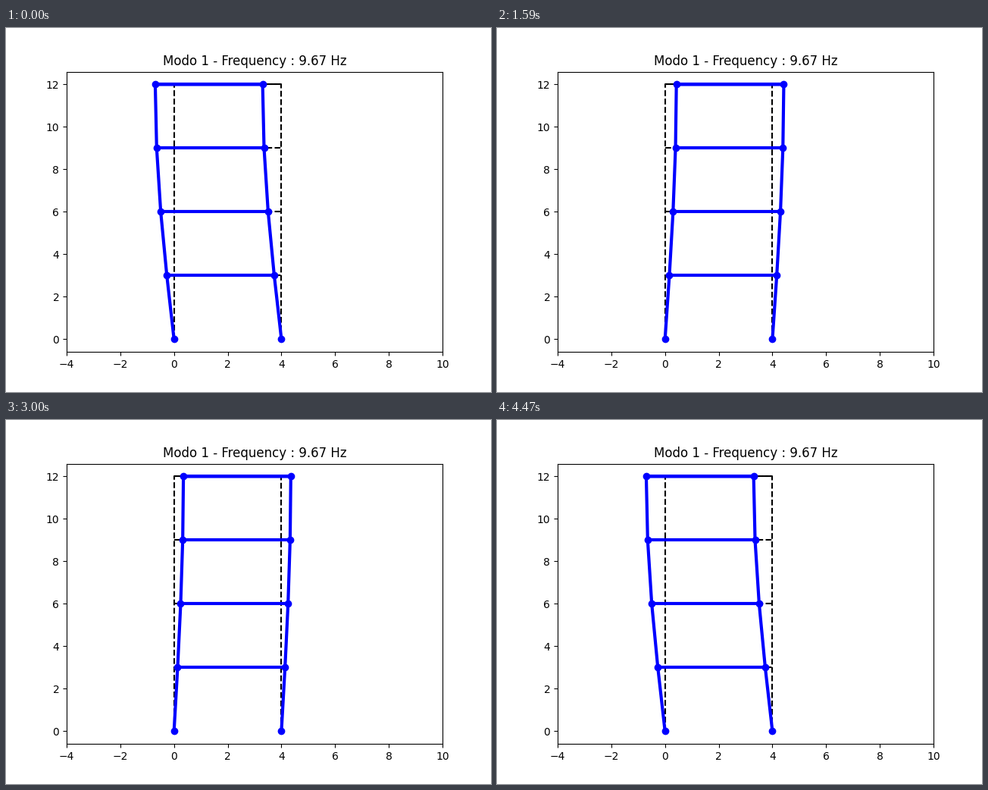
Write a matplotlib script that moves like this. It is 640x480 px and loops after 4500 ms.

```python
import numpy as np
import matplotlib.pyplot as plt
from matplotlib.animation import FuncAnimation

FRAMES = 150
INTERVAL = 30
WIDTH = 4
AMPLITUDE = 0.7

heights = np.arange(0, 13, 3)
# First sway mode of a four-storey shear frame with a lighter roof
mode = AMPLITUDE * np.sin(np.pi * np.arange(5) / 8)

fig, ax = plt.subplots(figsize=(6.4, 4.8), dpi=100)
ax.set_xlim(-4, 10)
ax.set_ylim(-0.6, 12.6)
ax.set_title("Modo 1 - Frequency : 9.67 Hz")


def outline(shift):
    """Up the left column, across the roof and down the right column."""
    x = np.concatenate([shift, WIDTH + shift[::-1]])
    y = np.concatenate([heights, heights[::-1]])
    return x, y


def beam(shift, level):
    return [shift[level], WIDTH + shift[level]], [heights[level]] * 2


def draw_frame(shift, style, marker=None, **kwargs):
    beams = [ax.plot(*beam(shift, i), style, **kwargs)[0] for i in range(1, 5)]
    columns, = ax.plot(*outline(shift), style, marker=marker, **kwargs)
    return columns, beams


draw_frame(np.zeros(5), "k--", lw=1.5)
columns, beams = draw_frame(-mode, "b-", marker="o", lw=3)


def update(frame):
    shift = -mode * np.cos(2 * np.pi * frame / FRAMES)
    columns.set_data(*outline(shift))
    for level, line in enumerate(beams, start=1):
        line.set_data(*beam(shift, level))
    return [columns, *beams]


anim = FuncAnimation(fig, update, frames=FRAMES, interval=INTERVAL,
                     repeat=True, repeat_delay=0)
plt.show()
```
